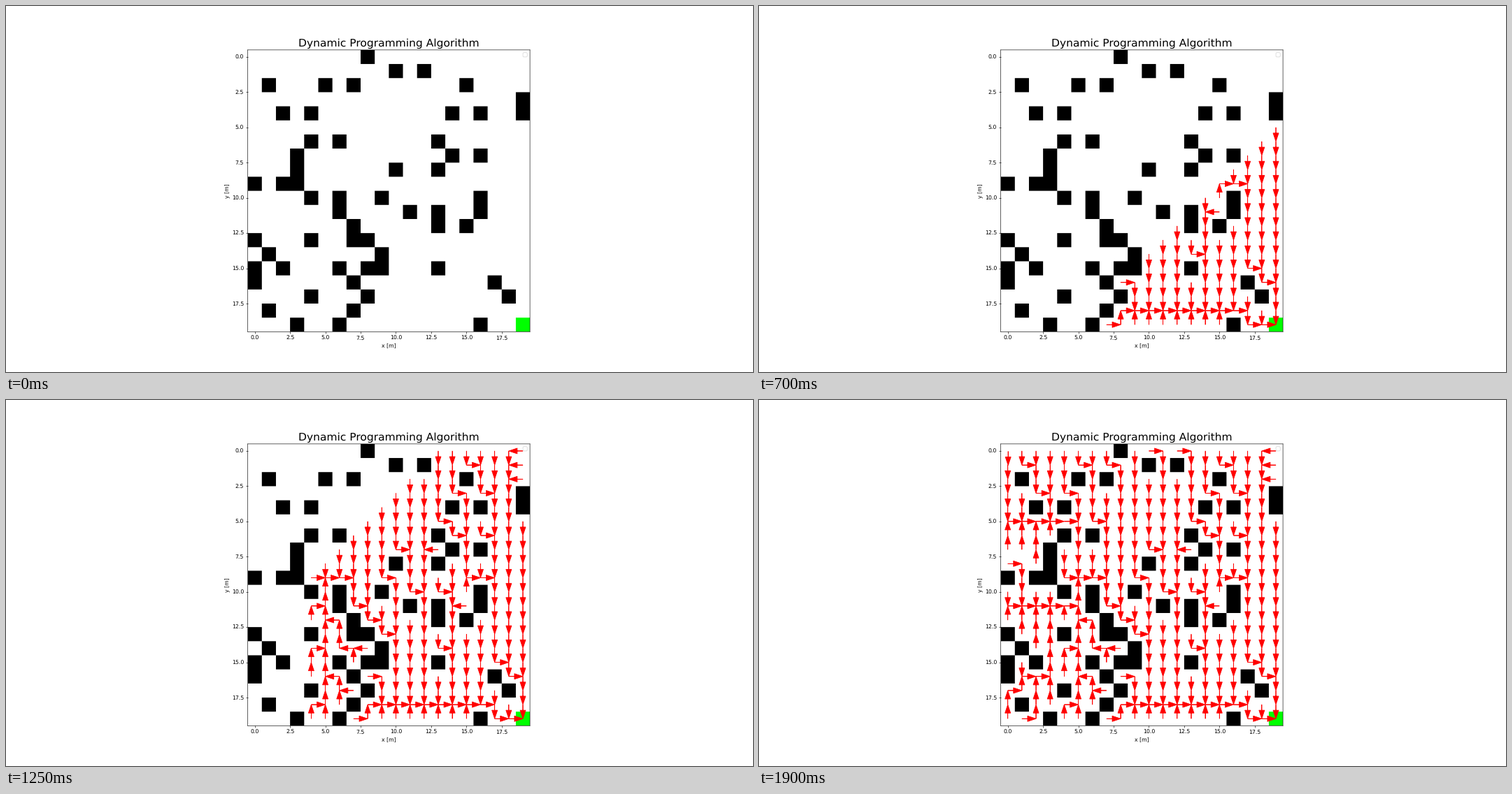
Write a matplotlib script that moves like this. It is 1068x524 px and loops after 5000 ms.

```python
import numpy as np
import matplotlib.pyplot as plt
from matplotlib.animation import FuncAnimation
from matplotlib.collections import PatchCollection
from matplotlib.patches import FancyArrow, PathPatch
from matplotlib.path import Path

WIDTH, HEIGHT, DPI = 1068, 524, 55.625
SIZE = 20
GOAL = (SIZE - 1, SIZE - 1)
FRAMES, INTERVAL = 100, 50

# Blocked columns of each row, from the top
WALLS = [
    [8], [10, 12], [1, 5, 7, 15], [19], [2, 4, 14, 16, 19],
    [], [4, 6, 13], [3, 14, 16], [3, 10, 13], [0, 2, 3],
    [4, 6, 9, 16], [6, 11, 13, 16], [7, 13, 15], [0, 4, 7, 8], [1, 9],
    [0, 2, 6, 8, 9, 13], [0, 7, 17], [4, 8, 18], [1, 7], [3, 6, 16],
]

# Up, left, down, right: earlier moves win ties
MOVES = [move for s in (-1, 1) for move in ((0, s), (s, 0))]


def sweep(cost):
    """Update costs in place and return the moves chosen in this pass."""
    chosen = {}
    for x, y in cost:
        for dx, dy in MOVES:
            new = cost.get((x + dx, y + dy), np.inf) + 1
            if new < cost[x, y]:
                cost[x, y] = new
                chosen[x, y] = (dx, dy)
    return chosen


def solve():
    """Return the moves found in each pass over the free cells."""
    cost = {(x, y): np.inf for y in range(SIZE) for x in range(SIZE)
            if x not in WALLS[y]}
    cost[GOAL] = 0
    passes = []
    while chosen := sweep(cost):
        passes.append(chosen)
    return passes


def make_arrows(chosen):
    arrows = [FancyArrow(x, y, dx, dy, width=0.001, head_width=0.4,
                         head_length=0.6, length_includes_head=True)
              for (x, y), (dx, dy) in chosen.items()]
    return PatchCollection(arrows, color="red", linewidth=1,
                           joinstyle="miter", capstyle="butt", zorder=1)


def fill_cells(ax, cells, color):
    """Fill cells as one shape, so that neighbours join without seams."""
    square = Path.unit_rectangle()
    path = Path.make_compound_path(
        *[Path(square.vertices + np.array(cell) - 0.5, square.codes)
          for cell in cells])
    ax.add_patch(PathPatch(path, facecolor=color, edgecolor="none",
                           linewidth=0, zorder=0.5))


def draw_grid(ax):
    walls = [(x, y) for y, row in enumerate(WALLS) for x in row]
    fill_cells(ax, walls, "black")
    fill_cells(ax, [GOAL], "lime")
    ax.set(xlim=(-0.5, SIZE - 0.5), ylim=(SIZE - 0.5, -0.5), aspect="equal",
           xlabel="x [m]", ylabel="y [m]")
    ax.set_title("Dynamic Programming Algorithm", fontsize=20)
    ax.legend(handles=[], labels=[], loc="upper right")


# Soft, unsnapped edges and unhinted glyphs
plt.rcParams.update({"font.family": "DejaVu Sans", "path.snap": False,
                     "text.hinting": "none"})
# The tiny margin guards against rounding down to one pixel less
fig, ax = plt.subplots(
    figsize=((WIDTH + 1e-3) / DPI, (HEIGHT + 1e-3) / DPI), dpi=DPI)
draw_grid(ax)
layers = [ax.add_collection(make_arrows(chosen), autolim=False)
          for chosen in solve()]


def update(frame):
    for i, layer in enumerate(layers):
        layer.set_visible(i < frame)
    return layers


anim = FuncAnimation(fig, update, frames=FRAMES, interval=INTERVAL,
                     repeat=True, repeat_delay=0, blit=False)
plt.show()
```
